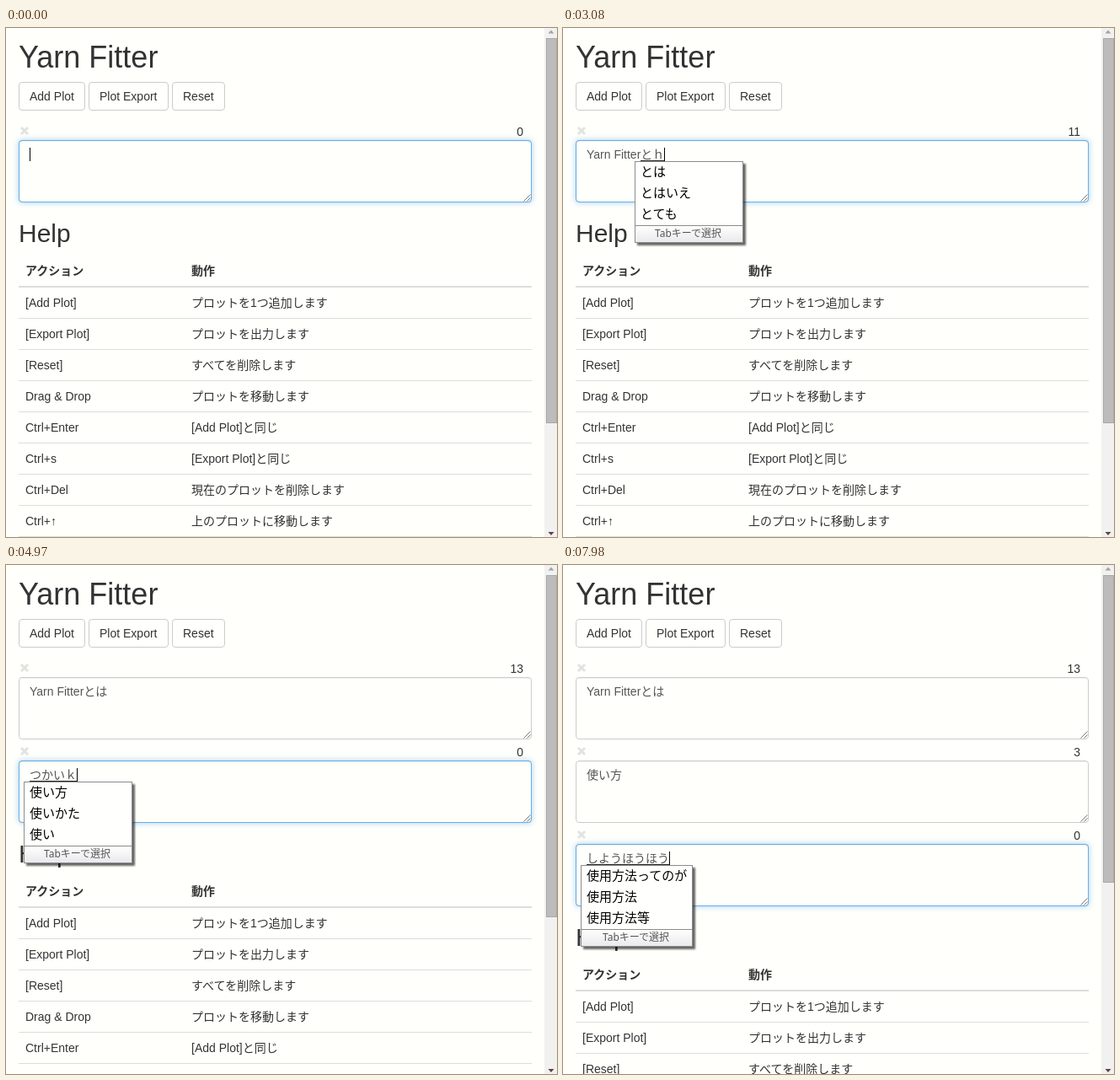
An HTML page that plays this animation: 654 px wide and 604 px high, repeating every 8 s.

```html
<!DOCTYPE html>
<html lang="ja">
<head>
<meta charset="utf-8">
<title>Yarn Fitter</title>
<style>
  html, body { margin: 0; width: 100%; height: 100%; overflow: hidden; background: #fffffb; }
  svg { display: block; }
  text { font: 14px "Liberation Sans", "Noto Sans CJK JP", "Noto Sans CJK", sans-serif; fill: #333; white-space: pre; }
  .entry { fill: #555; }
  .row { font: 15px "Noto Sans", "Noto Sans CJK JP", "Noto Sans CJK", sans-serif; fill: #000; }
  .hint { font: 12px "Noto Sans", "Noto Sans CJK JP", "Noto Sans CJK", sans-serif; fill: #555; }
</style>
</head>
<body>
<svg id="stage" width="654" height="604" viewBox="0 0 654 604">
  <defs>
    <filter id="glow" filterUnits="userSpaceOnUse" x="0" y="-20" width="654" height="120"><feGaussianBlur stdDeviation="3.5"/></filter>
    <filter id="soft" x="-10%" y="-10%" width="120%" height="120%"><feGaussianBlur stdDeviation="1"/></filter>
    <linearGradient id="footer" x2="0" y2="1">
      <stop stop-color="#fffffd"/><stop offset="1" stop-color="#e9e9ee"/>
    </linearGradient>
  </defs>
</svg>
<script>
const LOOP = 8000, TICK = 70, BOX_TOP = 133, BOX_GAP = 99, TEXT_X = 28;
const NAME = 'Yarn Fitter';
const FINISHED = [NAME + 'とは', '使い方'];
const ADDED = [-1000, 4130, 6510];
const THUMB_END = [469, 418, 377];

const HELP = [
  ['[Add Plot]', 'プロットを1つ追加します'],
  ['[Export Plot]', 'プロットを出力します'],
  ['[Reset]', 'すべてを削除します'],
  ['Drag & Drop', 'プロットを移動します'],
  ['Ctrl+Enter', '[Add Plot]と同じ'],
  ['Ctrl+s', '[Export Plot]と同じ'],
  ['Ctrl+Del', '現在のプロットを削除します'],
  ['Ctrl+↑', '上のプロットに移動します'],
];

const LATIN = ['Yarn', 'Yes', 'You'];
const TOPIC = ['とは', 'とはいえ', 'とても'];
const USAGE = ['使い方', '使いかた', '使い'];
const SHORT = ['使用方法', 'した！', 'ショートカットキー'];
const METHOD = ['使用方法ってのが', '使用方法', '使用方法等'];

// [start ms, box, committed text, text being composed, suggestions, caret hidden]
const STEPS = [
  [0, 0, '', ''],
  [420, 0, '', '', [], true],
  [700, 0, '', '', LATIN],
  [840, 0, '', 'Y', LATIN],
  [980, 0, '', 'Ya', LATIN],
  [1190, 0, '', 'Yar', LATIN],
  [1330, 0, '', 'Yarn', ['Yarn']],
  ...[1680, 1960, 2030, 2170, 2240, 2380].map((ms, i) => {
    const typed = NAME.slice(0, 6 + i);
    return [ms, 0, '', typed, [typed]];
  }),
  [2660, 0, NAME, ''],
  [2800, 0, NAME, 'ｔ', TOPIC],
  [2940, 0, NAME, 'と', TOPIC],
  [3010, 0, NAME, 'とｈ', TOPIC],
  [3150, 0, NAME, 'とは', TOPIC],
  [3430, 0, FINISHED[0], ''],
  [3920, 0, FINISHED[0], '', [], true],
  [4130, 1, '', ''],
  [4410, 1, '', '', USAGE],
  [4480, 1, '', 'ｔ', USAGE],
  [4620, 1, '', 'つ', USAGE],
  [4690, 1, '', 'つｋ', USAGE],
  [4830, 1, '', 'つか', USAGE],
  [4900, 1, '', 'つかい', USAGE],
  [4970, 1, '', 'つかいｋ', USAGE],
  [5110, 1, '', 'つかいか', USAGE],
  [5250, 1, '', 'つかいかｔ', USAGE],
  [5390, 1, '', 'つかいかた', USAGE],
  [5530, 1, '', '使い方'],
  [5950, 1, FINISHED[1], ''],
  [6440, 1, FINISHED[1], '', [], true],
  [6510, 2, '', ''],
  [6860, 2, '', '', SHORT],
  [6930, 2, '', 'ｓ', SHORT],
  [7070, 2, '', 'し', SHORT],
  [7210, 2, '', 'しよ', METHOD],
  [7350, 2, '', 'しよう', METHOD],
  [7560, 2, '', 'しようｈ', METHOD],
  [7630, 2, '', 'しようほ', METHOD],
  [7770, 2, '', 'しようほう', METHOD],
  [7910, 2, '', 'しようほうほ', METHOD],
  [7980, 2, '', 'しようほうほう', METHOD],
];

const stage = document.getElementById('stage');

function set(node, attrs) {
  for (const key in attrs) node.setAttribute(key, attrs[key]);
  return node;
}
function add(parent, tag, attrs) {
  return parent.appendChild(set(document.createElementNS('http://www.w3.org/2000/svg', tag), attrs));
}
function rect(parent, x, y, width, height, attrs) {
  return add(parent, 'rect', { x, y, width, height, ...attrs });
}
function label(parent, x, y, content, attrs) {
  const node = add(parent, 'text', { x, y, ...attrs });
  node.textContent = content;
  return node;
}
function show(node, visible) {
  node.style.display = visible ? '' : 'none';
}

function buildHeader() {
  rect(stage, 0, 0, 654, 604, { fill: '#fffffb' });
  label(stage, 15, 47, NAME, { style: 'font-size:36px' });
  for (const [x, width, caption] of [[15, 79, 'Add Plot'], [98, 95, 'Plot Export'], [197, 63, 'Reset']]) {
    rect(stage, x + .5, 64.5, width - 1, 33, { rx: 3.5, fill: 'none', stroke: '#ccc' });
    label(stage, x + 13, 86, caption);
  }
}

function buildHelp() {
  const group = add(stage, 'g');
  label(group, 15, 254, 'Help', { style: 'font-size:30px' });
  label(group, 23, 293, 'アクション', { style: 'font-weight:bold' });
  label(group, 220, 293, '動作', { style: 'font-weight:bold' });
  rect(group, 15, 306, 609, 2, { fill: '#ddd' });
  HELP.forEach(([action, effect], i) => {
    const y = 331 + 37 * i;
    label(group, 23, y, action);
    label(group, 220, y, effect);
    rect(group, 15, y + 13, 609, 1, { fill: '#ddd' });
  });
  return group;
}

function buildBox(_, index) {
  const group = add(stage, 'g', { transform: `translate(0 ${BOX_TOP + BOX_GAP * index})` });
  const glow = rect(group, 15, 0, 609, 74, { rx: 4, fill: '#66afe9', filter: 'url(#glow)' });
  add(group, 'path', { d: 'M18-15l8 8m0-8l-8 8', stroke: '#e2e2e0', 'stroke-width': 3 });
  const count = label(group, 614, -5, '0', { 'text-anchor': 'end' });
  rect(group, 15.5, .5, 608, 73, { rx: 3.5, fill: '#fffffb', stroke: '#ccc' });
  rect(group, 18, 1, 603, 1, { fill: '#000', opacity: .05 });
  const border = rect(group, 15.5, .5, 608, 73, { rx: 3.5, fill: 'none', stroke: '#66afe9' });
  add(group, 'path', { d: 'M614.5 72.5l8-8m-4 8l4-4', stroke: '#777', fill: 'none' });
  const entry = label(group, TEXT_X, 22, '', { class: 'entry' });
  const underline = rect(group, TEXT_X, 24, 0, 1, { fill: '#222' });
  const caret = rect(group, TEXT_X, 9, 1, 16, { fill: '#000' });
  return { group, glow, border, count, entry, underline, caret };
}

function buildScrollbar() {
  rect(stage, 639, 0, 15, 604, { fill: '#f1f1f0' });
  add(stage, 'path', { d: 'M643.5 6.5h7l-3.5-4z', fill: '#a3a3a3' });
  add(stage, 'path', { d: 'M643.5 598h7l-3.5 4z', fill: '#604048' });
  return rect(stage, 641.5, 12.5, 12, 0, { fill: '#bcbcbc', stroke: '#a8a8a8' });
}

function buildPopup() {
  const group = add(stage, 'g');
  const shadow = rect(group, 3, 3, 0, 0, { fill: '#000', opacity: .6, filter: 'url(#soft)' });
  const panel = rect(group, .5, .5, 0, 0, { fill: '#fffffd', stroke: '#8c8c8c' });
  const footer = rect(group, .5, 0, 0, 20, { fill: 'url(#footer)', stroke: '#8c8c8c' });
  const rows = [0, 1, 2].map(i => label(group, 7, 18 + 25 * i, '', { class: 'row' }));
  const hint = label(group, 0, 0, 'Tabキーで選択', { class: 'hint', 'text-anchor': 'middle' });
  return { group, shadow, panel, footer, rows, hint };
}

buildHeader();
const help = buildHelp();
const boxes = ADDED.map(buildBox);
const thumb = buildScrollbar();
const popup = buildPopup();

function drawPopup(x, y, items) {
  show(popup.group, items.length);
  if (!items.length) return;
  popup.rows.forEach((row, i) => { row.textContent = items[i] || ''; });
  const textWidth = Math.max(...popup.rows.map(row => row.getComputedTextLength()));
  const width = Math.max(129, Math.round(textWidth) + 14);
  const split = 1 + 25 * items.length, height = split + 21;
  set(popup.group, { transform: `translate(${x} ${y})` });
  set(popup.shadow, { width, height });
  set(popup.panel, { width: width - 1, height: height - 1 });
  set(popup.footer, { y: split + .5, width: width - 1 });
  set(popup.hint, { x: width / 2 - 1, y: split + 14 });
}

// Focus fades over 150 ms, sampled at the screen's tick.
function focusOf(index, active, t) {
  if (index < active - 1 || index > active) return 0;
  const p = Math.min(1, Math.floor((t - ADDED[active]) / TICK) * TICK / 150);
  const eased = p * p * (3 - 2 * p);
  return index === active ? eased : 1 - eased;
}

function render(t) {
  const [, active, done, typing, items = [], caretHidden] = STEPS.findLast(step => step[0] <= t);

  boxes.forEach((box, i) => {
    show(box.group, i <= active);
    if (i > active) return;
    const current = i === active;
    const committed = current ? done : FINISHED[i];
    const focus = focusOf(i, active, t);
    set(box.glow, { opacity: focus * .6 });
    set(box.border, { opacity: focus });
    box.count.textContent = committed.length;
    box.entry.textContent = committed + (current ? typing : '');
    show(box.caret, current && !caretHidden);
    show(box.underline, current && typing);
    if (!current) return;
    const start = TEXT_X + (done ? box.entry.getSubStringLength(0, done.length) : 0);
    const end = TEXT_X + (done + typing ? box.entry.getComputedTextLength() : 0);
    set(box.caret, { x: Math.round(end) });
    set(box.underline, { x: Math.round(start), width: Math.round(end) - Math.round(start) });
    drawPopup(Math.round(start) - 7, BOX_TOP + BOX_GAP * i + 25, items);
  });

  set(help, { transform: `translate(0 ${BOX_GAP * active})` });
  set(thumb, { height: THUMB_END[active] - 13 });
}

const began = performance.now();
function frame() {
  render((performance.now() - began) % LOOP);
  requestAnimationFrame(frame);
}
frame();
</script>
</body>
</html>
```
